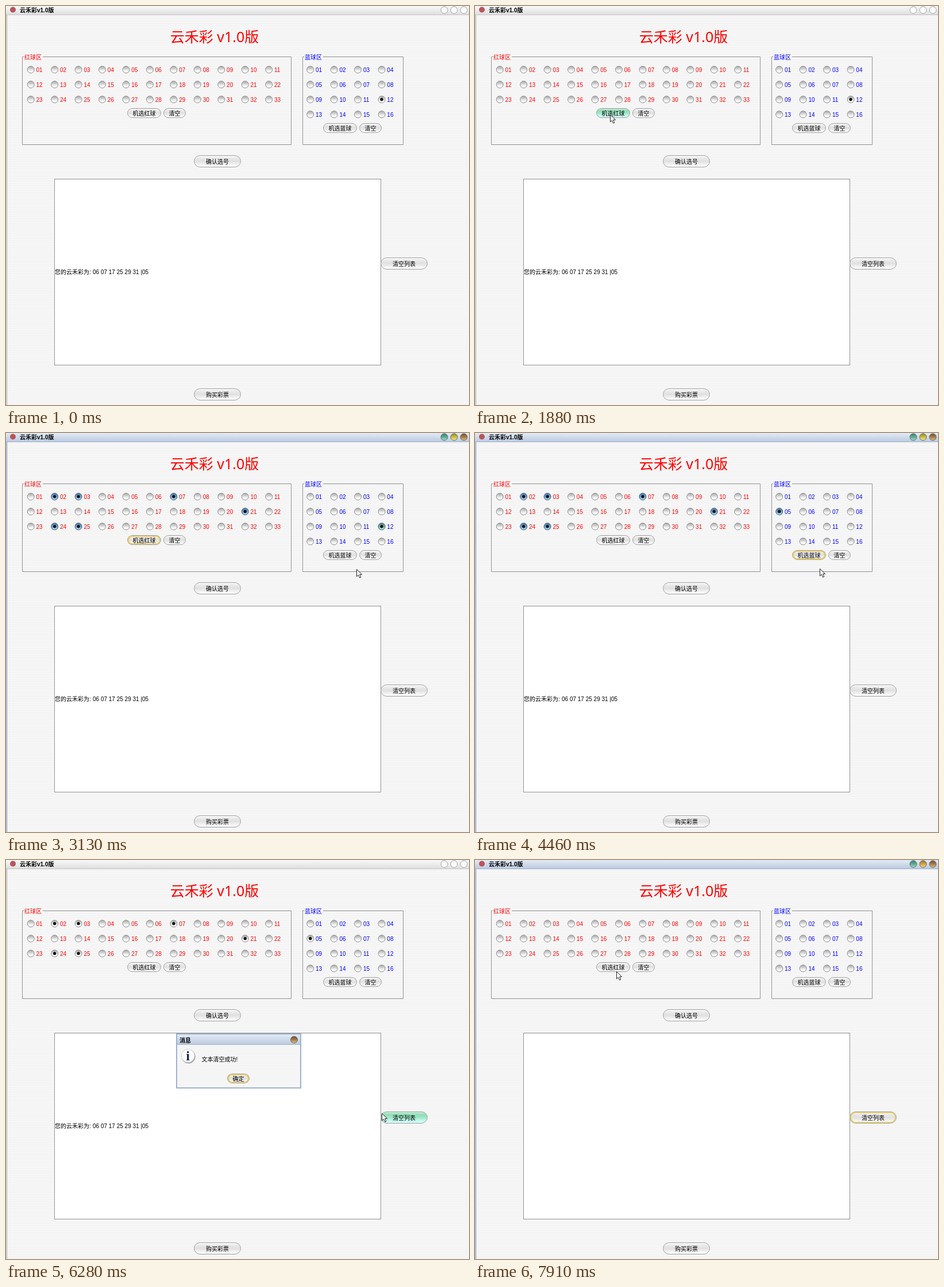
An HTML page for the animation above (8 s loop, 806 px wide and 695 px high).

```html
<!DOCTYPE html>
<html lang="zh-CN">
<head>
<meta charset="utf-8">
<title>云禾彩</title>
<style>
html, body { margin: 0; width: 100%; height: 100%; overflow: hidden; background: #f5f5f5; }
svg { display: block; width: 806px; height: 695px; }
text { font: 10px "Liberation Sans", "Noto Sans CJK SC", "Noto Sans CJK", sans-serif; white-space: pre; }
.big { font: 25px "Noto Sans", "Noto Sans CJK SC", "Noto Sans CJK", sans-serif; }
.bold { font-weight: bold; }
.info { font: bold 23px "Liberation Serif", serif; }
</style>
</head>
<body>
<svg id="stage" viewBox="0 0 806 695" xmlns="http://www.w3.org/2000/svg"></svg>
<script>
const LOOP = 8000;
const NAME = '云禾彩';
const LINE = '#929292';
const svg = document.getElementById('stage');

// ---- building helpers ----
function set(el, attrs) {
  for (const k in attrs) el.setAttribute(k, attrs[k]);
}
function add(tag, attrs, parent = svg, text) {
  const el = document.createElementNS('http://www.w3.org/2000/svg', tag);
  set(el, attrs);
  if (text !== undefined) el.textContent = text;
  parent.appendChild(el);
  return el;
}
function show(el, on) {
  el.setAttribute('visibility', on ? 'visible' : 'hidden');
}
function rect(x, y, width, height, fill, parent, more) {
  return add('rect', { x, y, width, height, fill, ...more }, parent);
}
function label(x, y, str, fill = '#000', parent = svg, more) {
  return add('text', { x, y, fill, ...more }, parent, str);
}
const defs = add('defs', {});
function gradient(id, ...colors) {
  const g = add('linearGradient', { id, x1: 0, y1: 0, x2: 0, y2: 1 }, defs);
  colors.forEach((c, i) => add('stop', { offset: i / (colors.length - 1), 'stop-color': c }, g));
}

gradient('plain', '#fbfbfb', '#e9e9e9', '#e0e0e0', '#f1f1f1', '#ffffff');
gradient('hover', '#c9f0dc', '#93ddb6', '#9ce6c6', '#c0f8ea', '#d9ffff');
gradient('press', '#f1f1f1', '#fafafa', '#ffffff');
gradient('ball', '#a6a6a6', '#cbcbcb', '#f6f6f6', '#ffffff');
gradient('blueBall', '#4a78a8', '#6ea4d4', '#b4dcf8');
gradient('tealBall', '#4c8c84', '#74b8ac', '#c0f0e4');
gradient('barOn', '#e3eaf5', '#cfdaea', '#bccbe1');
gradient('barOff', '#f8f8f8', '#ececec', '#dedede');
gradient('teal', '#3a7f6e', '#58ab96', '#a5e2cd');
gradient('yellow', '#8e8226', '#cdbd3c', '#f4ec93');
gradient('orange', '#94702a', '#d6a344', '#f6d78e');
gradient('brown', '#6e4d30', '#a87a46', '#e2be86');

const stripes = add('pattern', { id: 'stripes', width: 3, height: 3, patternUnits: 'userSpaceOnUse' }, defs);
rect(0, 0, 3, 3, '#f8f8f8', stripes);
rect(0, 0, 3, 1, '#efefef', stripes);

// ---- window ----
rect(0, 0, 806, 695, 'url(#stripes)');
const edge = rect(0, 15, 2.5, 680);
const bar = rect(0, 0, 806, 15);
const barLine = rect(0, 15, 806, 1);
add('circle', { cx: 12, cy: 6.5, r: 5, fill: '#b9545c' });
label(24, 11, NAME + 'v1.0版', '#000', svg, { class: 'bold' });
function windowDot(cx, cy, parent, fill) {
  return add('circle', { cx, cy, r: 6, fill, stroke: '#6c6c5c' }, parent);
}
const dots = [0, 1, 2].map(i => windowDot(763 + 17 * i, 7));
label(285.8, 63, NAME + ' v1.0版', '#ff0000', svg, { class: 'big' });

function radioGroup(x, w, title, color, count, perRow) {
  add('path', {
    d: `M${x + 3} 88.5H${x + 0.5}V241.5H${x + w + 0.5}V88.5H${x + 36}`,
    fill: 'none', stroke: LINE
  });
  label(x + 4, 92.5, title, color);
  return Array.from({ length: count }, (_, i) => {
    const cx = x + 15.2 - (perRow === 4 ? 1.5 : 0) + (i % perRow) * 41.45;
    const cy = 110.8 + Math.floor(i / perRow) * 26;
    const body = add('circle', { cx, cy, r: 6 });
    const dot = add('circle', { cx, cy, r: 2.7, fill: '#111' });
    label(cx + 9.3, cy + 3.7, String(i + 1).padStart(2, '0'), color);
    return { body, dot };
  });
}
const reds = radioGroup(28, 468, '红球区', '#f00', 33, 11);
const blues = radioGroup(516, 175, '蓝球区', '#00f', 16, 4);

function button(x, y, w, h, str, parent = svg) {
  const g = add('g', {}, parent);
  const body = rect(x + 0.5, y + 0.5, w - 1, h - 1, '', g, { rx: h / 2, stroke: '#a0a0a0' });
  const ring = rect(x + 2, y + 2, w - 4, h - 4, 'none', g,
    { rx: h / 2 - 2, stroke: '#ebc544', 'stroke-width': 1.6 });
  const text = label(x + w / 2, y + h / 2 + 4, str, '#000', g, { 'text-anchor': 'middle' });
  const holds = (px, py) => px >= x && px < x + w && py >= y && py < y + h - 1;
  return { body, ring, text, holds };
}
const pickRed = button(211, 178, 59, 17, '机选红球');
const clearRed = button(274, 178, 39, 17, '清空');
const pickBlue = button(552, 204, 59, 17, '机选蓝球');
const clearBlue = button(615, 204, 39, 17, '清空');
const confirm = button(327, 260, 82, 21, '确认选号');
const buy = button(327, 666, 82, 21, '购买彩票');

rect(84.5, 301.5, 568, 324, '#fff', svg, { stroke: LINE });
const list = add('g', {});
label(85, 467, `您的${NAME}为:`, '#000', list);
label(151, 467, '06 07 17 25 29 31 |05', '#000', list);
const clearList = button(652, 438, 82, 21, '清空列表');

// ---- message box ----
const dialog = add('g', {});
rect(297, 303, 216, 94, 'url(#stripes)', dialog, { stroke: '#9fb2cc', 'stroke-width': 2 });
rect(298, 304, 214, 17, 'url(#barOn)', dialog);
rect(298, 321, 214, 1, '#9fb2cc', dialog);
label(302, 318, '消息', '#000', dialog, { class: 'bold' });
windowDot(501.5, 313, dialog, 'url(#brown)');
add('circle', { cx: 317.7, cy: 342.5, r: 12, fill: '#a5a5a5' }, dialog);
add('circle', { cx: 316.7, cy: 341, r: 11.5, fill: '#fcfcfc', stroke: '#cfcfcf' }, dialog);
label(316.7, 349, 'i', '#10214f', dialog, { class: 'info', 'text-anchor': 'middle' });
label(340.5, 350.5, '文本清空成功!', '#000', dialog);
const ok = button(385, 372, 39, 17, '确定', dialog);

const halo = add('circle', { r: 12.5, fill: '#fbf32a', opacity: 0.75 });
const cursor = add('path', {
  d: 'M.5 .5V13L3.4 10.3L5.6 15.2L7.8 14.2L5.6 9.4H9.6Z',
  fill: '#fff', stroke: '#222'
});

// ---- pointer: eased moves drawn in discrete steps ----
const START = { x: 623, y: 615 };
const moves = [
  [180, 860, 10, 376, 267],
  [1350, 1880, 8, 235, 189],
  [2820, 3124, 5, 610, 237],
  [3200, 3580, 6, 582, 210],
  [4460, 4460, 1, 600, 236],
  [4536, 5220, 10, 709, 456],
  [6050, 6840, 11, 408, 376],
  [7295, 7690, 6, 271, 210],
  [7760, 7910, 3, 246, 194]
];
const ease = f => f * f * (3 - 2 * f);
function pointerAt(t) {
  let { x, y } = START;
  for (const [from, to, steps, x1, y1] of moves) {
    if (t < from) break;
    const gap = (to - from) / Math.max(1, steps - 1);
    const done = t >= to ? steps : Math.floor((t - from) / gap) + 1;
    const f = ease(done / steps);
    x += (x1 - x) * f;
    y += (y1 - y) * f;
  }
  return [Math.round(x), Math.round(y)];
}

// ---- state ----
function paintButton(b, { hover, focus, pressed }) {
  set(b.body, { fill: `url(#${pressed ? 'press' : hover ? 'hover' : 'plain'})` });
  show(b.ring, focus);
  set(b.text, { transform: pressed ? 'translate(1 1)' : '' });
}
function paintRadio(r, on, active, fill) {
  const lit = on && active;
  set(r.body, { fill: `url(#${lit ? fill : 'ball'})`, stroke: lit ? '#3f5c78' : '#8e8e8e' });
  show(r.dot, on);
}

const RED_PICK = [2, 3, 7, 21, 24, 25];
const [RED_DOWN, RED_UP] = [2040, 2190];
const [BLUE_DOWN, BLUE_UP] = [3830, 3980];
const [LIST_DOWN, LIST_UP] = [5310, 5470];
const [OPEN, OK_DOWN, CLOSE] = [5610, 7137, 7210];

function render(t) {
  const within = (a, b) => t >= a && t < b;
  const open = within(OPEN, CLOSE);
  const active = t >= RED_DOWN && !open;
  const cleared = t >= CLOSE;
  const [px, py] = pointerAt(t);
  const over = b => t >= moves[0][0] && !open && b.holds(px, py);

  set(bar, { fill: active ? 'url(#barOn)' : 'url(#barOff)' });
  set(barLine, { fill: active ? '#9fb2cf' : '#c4c4c4' });
  set(edge, { fill: active ? '#aebfdb' : '#cdcdcd' });
  const tints = ['teal', cleared ? 'orange' : 'yellow', 'brown'];
  dots.forEach((d, i) => set(d, {
    fill: `url(#${active ? tints[i] : 'press'})`,
    stroke: active ? '#6c6c5c' : '#a4a4a4'
  }));

  reds.forEach((r, i) =>
    paintRadio(r, within(RED_UP, CLOSE) && RED_PICK.includes(i + 1), active, 'blueBall'));
  blues.forEach((r, i) => {
    const picked = t < BLUE_UP ? 12 : cleared ? 0 : 5;
    paintRadio(r, i + 1 === picked, active, picked === 12 ? 'tealBall' : 'blueBall');
  });

  paintButton(pickRed, {
    hover: over(pickRed), focus: within(RED_DOWN, BLUE_DOWN), pressed: within(RED_DOWN, RED_UP)
  });
  paintButton(pickBlue, {
    hover: over(pickBlue), focus: within(BLUE_DOWN, LIST_DOWN), pressed: within(BLUE_DOWN, BLUE_UP)
  });
  paintButton(clearList, {
    hover: open || over(clearList),
    focus: within(LIST_DOWN, OPEN) || cleared,
    pressed: within(LIST_DOWN, OPEN)
  });
  for (const b of [clearRed, clearBlue, confirm, buy]) paintButton(b, { hover: over(b), focus: false });
  paintButton(ok, { hover: ok.holds(px, py), focus: true, pressed: t >= OK_DOWN });

  show(list, !cleared);
  set(dialog, { display: open ? 'inline' : 'none' });
  show(halo, within(RED_DOWN, RED_UP) || within(BLUE_DOWN, BLUE_UP) ||
    within(LIST_DOWN, LIST_UP) || within(OK_DOWN, CLOSE));
  set(halo, { cx: px + 0.5, cy: py + 0.5 });
  show(cursor, t >= moves[0][0]);
  set(cursor, { transform: `translate(${px} ${py})` });
}

const start = performance.now();
function loop(now) {
  render(Math.max(0, now - start) % LOOP);
  requestAnimationFrame(loop);
}
render(0);
requestAnimationFrame(loop);
</script>
</body>
</html>
```
